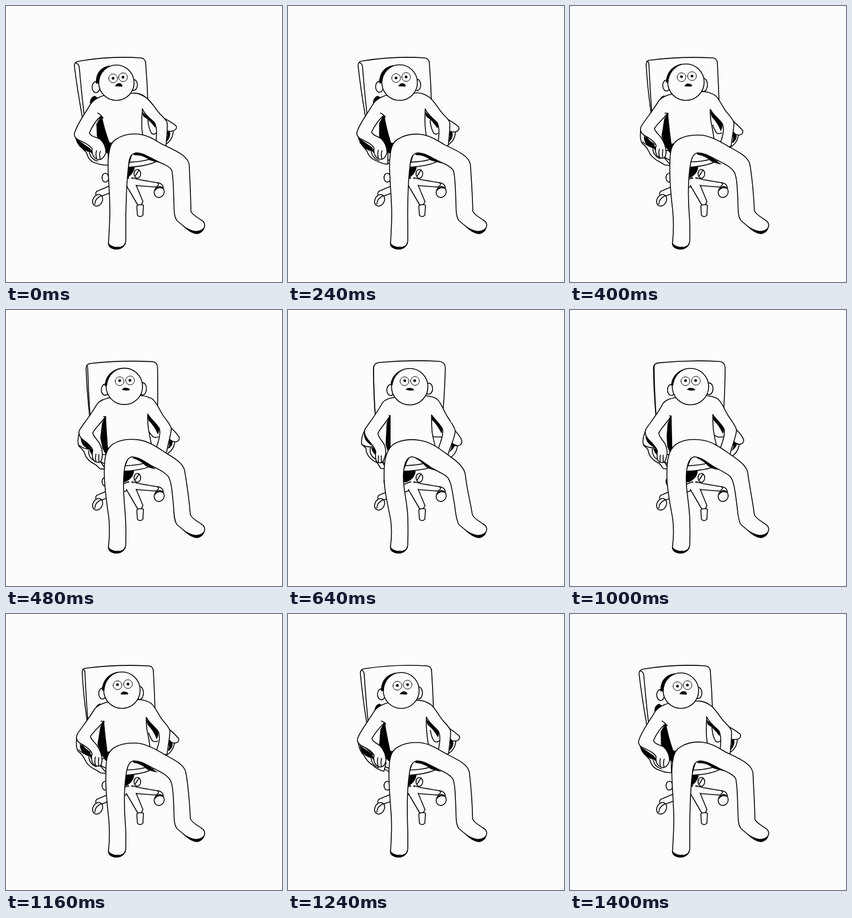
Recreate the animation shown at these times as an HTML page. Size 500x500 px, loop 1.52 s.

```html
<!DOCTYPE html>
<html lang="en">
<head>
<meta charset="utf-8">
<title>Swivel chair</title>
<style>
  html, body { margin: 0; width: 100%; height: 100%; overflow: hidden; background: #fcfcfc; }
  svg { display: block; width: 100vw; height: 100vh; }
  path { fill: #fcfcfc; stroke: #000; stroke-width: 1.6; stroke-linecap: round; stroke-linejoin: round; }
  .line { fill: none; }
  .thin { stroke-width: 1; }
  .ink { fill: #000; stroke-width: .6; }
  .blank { stroke: none; }
</style>
</head>
<body>
<svg viewBox="0 0 500 500">
  <filter id="rough" x="0" y="0" width="500" height="500" filterUnits="userSpaceOnUse" color-interpolation-filters="sRGB">
    <feTurbulence type="fractalNoise" baseFrequency=".15" numOctaves="1" seed="4"/>
    <feDisplacementMap in="SourceGraphic" scale="1.6" xChannelSelector="R" yChannelSelector="G"/>
  </filter>
  <g id="art" filter="url(#rough)"></g>
</svg>
<script>
const LOOP = 1520, MIDDLE = 0.45;
// [start in ms, turn: 0 = left, 1 = front]
const STEPS = [
  [0, 0], [120, -.03], [240, .1], [320, .23], [400, .45], [480, .68], [560, .88], [640, 1],
  [760, 1.02], [880, 1], [1000, .88], [1080, .68], [1160, .45], [1240, .23], [1320, .1], [1400, .04]
];
const art = document.getElementById('art');
const parts = [];
const NUM = /-?\d+(?:\.\d+)?/g;

function add(cls, d) {
  const el = document.createElementNS('http://www.w3.org/2000/svg', 'path');
  if (cls) el.setAttribute('class', cls);
  el.setAttribute('d', d);
  art.append(el);
  return el;
}
const nums = d => d.match(NUM).map(Number);

// A moving part: left pose, front pose, and optionally the pose between them.
function part(cls, left, front, mid) {
  const a = nums(left), c = nums(front);
  const b = mid ? nums(mid) : a.map((v, i) => v + (c[i] - v) * MIDDLE);
  parts.push({ el: add(cls, left), shape: left, a, b, c });
}
const oval = (x, y, rx, ry, tilt = 0) =>
  `M${x - rx * Math.cos(tilt)} ${y - rx * Math.sin(tilt)} a${rx} ${ry} ${tilt * 180 / Math.PI} 1 1 ` +
  `${2 * rx * Math.cos(tilt)} ${2 * rx * Math.sin(tilt)} a${rx} ${ry} ${tilt * 180 / Math.PI} 1 1 ` +
  `${-2 * rx * Math.cos(tilt)} ${-2 * rx * Math.sin(tilt)}Z`;
const ovals = (cls, left, mid, front) => part(cls, oval(...left), oval(...front), oval(...mid));

// Wheel base
add('', oval(180, 311, 6, 8));
add('', oval(238, 304, 6, 8));
add('line', 'M234 308 Q238 302 241 297');
add('', 'M222 311 L164 336 Q160 341 166 347 L222 326Z');
add('', 'M228 311 Q240 315 274 320 Q280 323 271 328 L232 325Z');
add('', 'M218 325 L239 361 Q246 362 248 354 L235 323');
add('blank', 'M219 313 L236 314 L236 324 L219 325Z');
add('', oval(277.5, 337, 9, 10, .4));
add('line', 'M270 334 Q275 327 283 330 M274 320 Q285 321 285 331');
add('', oval(166, 352, 8.5, 11, .5));
add('line', 'M161 359 Q161 349 172 344');
add('', 'M237 362 Q243 358 249 361 L248 379 Q243 384 238 379Z');

// Chair back
part('',
  'M138 200 Q129 150 124 110 Q123 101 132 100 Q190 90 244 94 Q253 95 253 104 Q256 140 257 175',
  'M158 190 Q155 145 155 108 Q154 96 166 95 Q220 90 274 93 Q284 94 285 104 Q284 145 281 180',
  'M147 195 Q140 145 138 106 Q138 98 146 98 Q200 91 259 94 Q267 95 267 104 Q269 140 270 175');
part('line',
  'M126 103 Q133 105 133 114 Q137 160 142 200',
  'M156 101 Q155 102 155 108 Q155 145 158 190',
  'M139 100 Q143 101 143 106 Q145 150 148 190');

// Column and seat
part('ink',
  'M216 288 L233 288 Q234 300 222 310 L214 312Z',
  'M206 288 L231 288 Q232 305 214 312 L206 312Z');
part('',
  'M166 262 Q170 292 222 292 Q262 290 278 278 L245 262Z',
  'M160 262 Q170 293 212 292 Q245 290 264 284 L240 262Z',
  'M165 262 Q168 292 216 292 Q252 290 268 279 L243 262Z');
part('line',
  'M172 272 Q178 283 222 283 Q250 282 264 276',
  'M168 272 Q175 283 212 282 Q234 281 246 278');
part('ink',
  'M230 264 L262 273 L280 284 Q270 282 260 279 Q248 269 232 270Z',
  'M228 262 L250 276 L266 290 Q258 289 250 284 Q242 274 230 268Z');
part('ink',
  'M222 290 L224 268 L232 264 L228 270Z',
  'M208 294 L212 268 L222 264 L216 274Z');

// Left armrest
part('',
  'M126 236 Q130 250 146 266 Q150 282 164 285 Q176 289 186 288 L184 250 L150 240Z',
  'M139 218 Q131 234 134 244 Q138 248 141 250 Q142 268 162 277 Q168 287 178 288 L176 240 L155 235Z',
  'M128 226 Q126 242 131 249 Q138 254 142 262 Q147 275 162 282 Q172 288 183 289 L182 245 L150 236Z');
part('line',
  'M130 248 Q138 258 150 263 M151 266 Q154 278 166 281',
  'M134 244 Q142 249 156 248 M149 250 Q147 264 160 271');
part('ink',
  'M126 240 Q138 248 152 258 L157 266 Q142 263 134 255 Q128 248 126 240Z',
  'M138 221 Q141 230 152 242 L157 248 Q147 244 141 236 Q137 229 138 221Z',
  'M134 236 Q144 244 153 250 L152 258 Q143 256 138 250 Q134 244 134 236Z');
part('ink',
  'M152 262 L158 260 L164 273 Q156 270 152 262Z',
  'M151 250 L157 250 L159 262 Q154 260 151 250Z');

// Right armrest
part('',
  'M303 225 Q303 242 290 250 L288 226Z',
  'M307 246 Q305 264 286 272 L284 245Z',
  'M305 233 Q304 248 289 257 L287 230Z');
part('',
  'M276 198 Q300 210 308 217 Q311 222 304 226 L292 228 L290 212Z',
  'M302 218 Q312 228 315 237 Q316 245 307 246 L297 242 L298 225Z',
  'M292 206 Q306 217 313 226 Q314 233 306 234 L296 232 L294 216Z');
part('ink',
  'M296 226 Q300 235 291 246 L291 240 Q295 234 291 228Z',
  'M296 240 Q306 244 298 252 L293 257 Q299 246 294 243Z',
  'M296 228 Q308 236 295 248 L294 246 Q298 238 293 232Z');
part('line',
  'M257 205 Q258 222 264 231 Q268 234 272 230',
  'M261 229 Q266 230 269 230 Q273 230 278 230');

// Shadows behind the body
part('ink',
  'M174 196 L190 250 L186 268 L176 262 L165 236 L164 214Z',
  'M186 188 L187 250 L181 256 L177 244 L178 225 L179 205Z',
  'M178 192 L186 250 L181 266 L174 256 L166 236 L171 205Z');
part('ink',
  'M247 192 L268 210 Q272 214 270 220 Q260 206 249 200Z',
  'M260 190 L277 210 Q281 217 278 223 Q270 207 261 199Z',
  'M254 190 L274 211 Q278 218 273 226 Q268 212 257 201Z');
part('ink',
  'M152 176 Q153 164 161 163 L168 168Z',
  'M173 172 Q175 165 181 162 L188 163Z');
part('ink',
  'M234 158 Q250 158 257 170 L246 166Z',
  'M252 158 Q262 158 268 162 L262 162Z');

// Torso and arms
part('',
  'M185 160 C172 163 160 168 153 178 C143 195 130 212 125 228 C122 234 124 238 130 242 C143 248 152 252 156 259 C155 268 158 275 166 278 C174 280 178 273 181 266 C181 258 178 248 170 241 C162 237 154 237 151 230 C155 220 164 205 173 199 C176 215 182 235 187 248 L250 248 C249 240 245 225 246 210 C246 200 247 192 247 186 C250 195 262 205 268 210 C274 218 273 232 272 244 C276 254 284 256 290 252 C291 235 293 225 292 212 C291 205 282 200 276 192 C268 182 262 172 254 166 C245 160 238 157 230 158Z',
  'M195 158 C184 160 177 161 171 168 C162 186 149 202 140 215 C137 220 139 227 144 234 C151 242 157 249 159 256 C158 266 158 273 162 276 C168 278 173 276 174 270 C178 262 178 252 174 243 C169 235 163 230 163 223 C168 213 178 204 185 191 C185 210 185 230 185 250 L268 252 C265 240 262 230 261 220 C260 208 260 200 260 190 C267 200 276 207 280 216 C282 226 276 240 272 252 C273 262 284 268 290 262 C293 248 301 236 303 220 C303 213 295 203 288 192 C280 178 276 165 268 160 C262 157 256 156 248 155Z',
  'M190 158 C178 161 166 164 160 173 C150 190 137 205 129 218 C126 225 128 230 134 234 C145 240 154 246 156 253 C153 263 156 273 164 275 C172 278 173 272 174 266 C174 255 170 245 164 237 C158 230 154 227 153 222 C158 213 170 204 177 194 C178 212 181 232 183 250 L262 248 C260 236 259 225 256 213 C254 203 254 195 254 187 C258 195 270 205 276 213 C280 222 277 236 273 246 C278 257 286 258 292 253 C294 235 297 222 297 212 C296 205 288 198 282 190 C275 180 270 168 263 162 C255 157 248 155 240 155Z');
part('line',
  'M166 194 Q170 195 176 203 M164 262 Q162 268 164 276 M171 263 Q168 270 171 278',
  'M183 191 Q184 191 185 193 M164 264 Q163 270 164 276 M169 264 Q169 270 169 277',
  'M172 194 Q174 194 178 195 M162 259 Q160 266 162 273 M168 260 Q167 268 168 275');

// Legs and shoes
part('',
  'M186 426 C187 400 189 380 188 360 C187 320 184 300 185 280 C187 256 190 247 200 241 C212 233 228 231 240 232 C258 234 270 243 282 250 C310 263 330 272 332 288 C333 315 335 350 335 372 C338 379 346 382 354 388 C361 392 362 399 356 406 C351 411 342 411 335 408 C327 404 318 396 309 388 C303 378 305 365 304 350 C303 325 303 305 300 297 C294 288 280 285 266 277 C252 270 245 266 236 266 C226 267 223 275 222 290 C218 320 218 350 217 380 C217 400 217 415 217 426 C215 436 208 440 200 440 C190 440 184 436 186 426Z',
  'M186 426 C188 410 188 395 186 380 C180 350 174 325 174 300 C174 270 178 255 190 244 C202 236 220 233 238 236 C262 239 280 256 296 267 C310 277 319 286 321 297 C324 325 331 350 334 371 C338 379 346 382 354 388 C361 392 362 399 356 406 C351 411 342 411 335 408 C327 404 318 396 309 388 C304 376 304 368 302 355 C298 330 296 312 289 303 C283 297 274 294 260 286 C248 278 235 266 223 266 C214 268 210 280 209 298 C208 325 216 345 217 375 C218 400 217 415 217 426 C215 436 208 440 200 440 C190 440 184 436 186 426Z',
  'M186 426 C188 405 188 390 186 370 C182 335 180 305 181 285 C181 262 184 250 196 242 C208 235 222 233 238 234 C255 235 275 247 288 255 C308 266 320 272 325 284 C329 300 333 345 334 371 C338 379 346 382 354 388 C361 392 362 399 356 406 C351 411 342 411 335 408 C327 404 318 396 309 388 C303 378 305 365 304 350 C303 325 302 308 297 300 C290 290 278 285 264 278 C250 270 242 266 231 266 C222 268 219 278 217 295 C213 325 214 350 216 378 C218 400 217 415 217 426 C215 436 208 440 200 440 C190 440 184 436 186 426Z');
add('ink', 'M185 429 Q188 441 200 441 Q211 441 217 430 Q211 437 203 437 Q191 437 185 429Z');
add('ink', 'M320 398 Q334 412 346 413 Q357 411 359 402 Q352 408 344 408 Q334 407 320 398Z');

// Head
ovals('', [163, 147, 7, 10], [175, 144, 7, 10], [186, 145, 7, 10]);
ovals('', [231, 143, 7, 10], [242, 143, 7, 12], [255, 142.5, 7, 10]);
ovals('', [200, 139, 32, 32], [210, 138, 33, 33], [220.5, 139, 33, 33]);
part('ink',
  'M163 140 C163 120 172 111 188 108 C176 114 169 124 168 140Z',
  'M186 136 C187 122 196 111 211 107 C198 113 191 123 189 136Z',
  'M174 138 C175 120 185 109 202 105 C188 112 179 122 178 138Z');
ovals('thin', [194, 131, 8, 8], [202, 129, 8, 8], [211, 129, 8, 8]);
ovals('thin', [212, 129, 8, 8], [221, 127, 8, 8], [230, 128.5, 8, 8]);
ovals('ink', [194, 131, 2.2, 2.2], [202, 128, 2.2, 2.2], [211.5, 128, 2.2, 2.2]);
ovals('ink', [212, 129, 2.2, 2.2], [221, 127, 2.2, 2.2], [229.5, 128, 2.2, 2.2]);
part('ink',
  'M198 145 Q200 140 206 140 Q212 142 210 146 Q204 145 198 145Z',
  'M214 144 Q215 141 221 141.5 Q228 142 228 145 Q220 147 214 144Z',
  'M208 145 Q210 140 215 141 Q222 142 221 145 Q215 146 208 145Z');

function pose(turn) {
  const late = turn > MIDDLE;
  const k = late ? (turn - MIDDLE) / (1 - MIDDLE) : turn / MIDDLE;
  for (const { el, shape, a, b, c } of parts) {
    const from = late ? b : a, to = late ? c : b;
    let i = 0;
    el.setAttribute('d', shape.replace(NUM, () => {
      const v = from[i] + (to[i] - from[i]) * k;
      i++;
      return +v.toFixed(2);
    }));
  }
}

let shown = null;
function tick() {
  const t = performance.now() % LOOP;
  const turn = STEPS.findLast(s => s[0] <= t)[1];
  if (turn !== shown) pose(shown = turn);
  requestAnimationFrame(tick);
}
tick();
</script>
</body>
</html>
```
